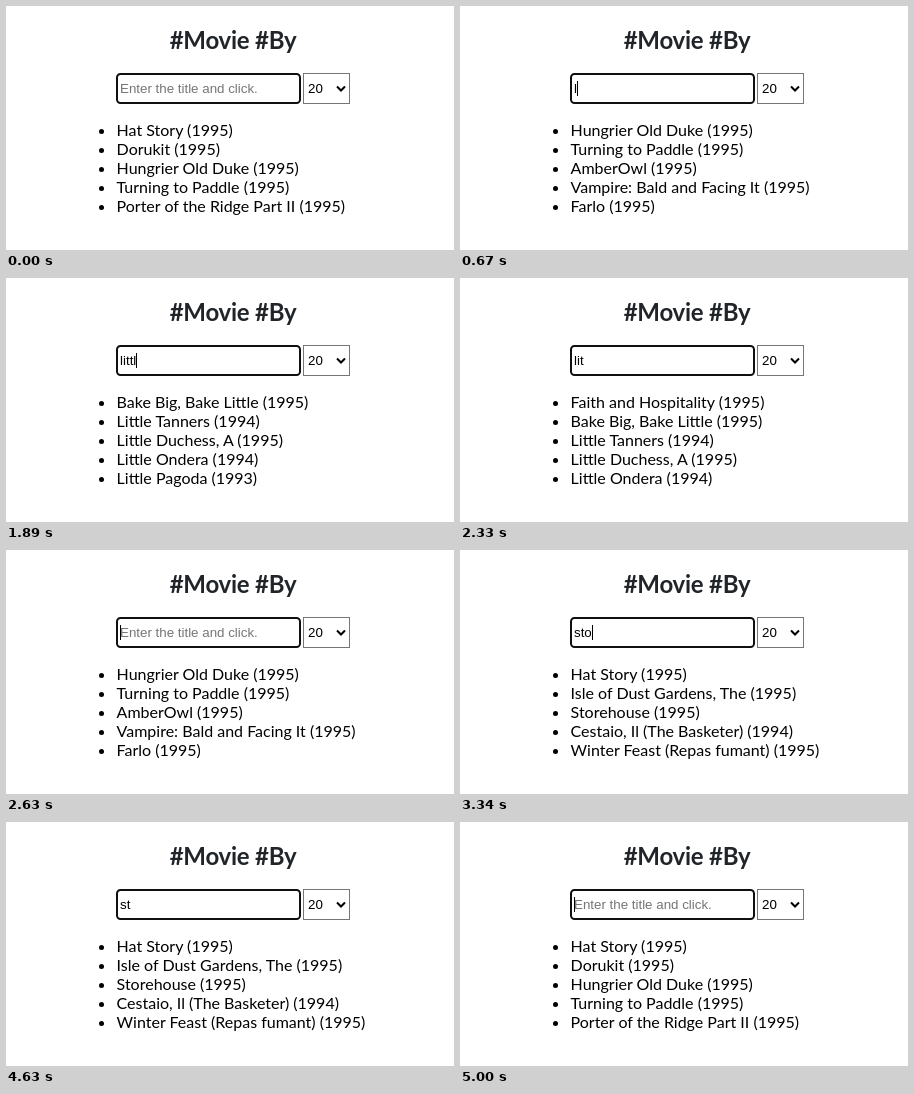
An HTML page for the animation above (5.28 s loop, 448 by 244 pixels).

```html
<!DOCTYPE html>
<html lang="en">
<head>
<meta charset="utf-8">
<title>Movie search</title>
<style>
  html, body { margin: 0; width: 100%; height: 100%; overflow: hidden; background: #fff; }
  svg { display: block; width: 448px; height: 244px; }
  .title { font: 700 24px Lato, sans-serif; letter-spacing: -.25px; fill: #212529; text-anchor: middle; }
  .field { font: 13.333px "Liberation Sans", Arial, sans-serif; white-space: pre; }
  .hint { fill: #757575; }
  #list { font: 16px Lato, sans-serif; }
</style>
</head>
<body>
<svg viewBox="0 0 448 244" xmlns="http://www.w3.org/2000/svg">
  <rect width="448" height="244" fill="#fff"/>
  <text class="title" x="227" y="42.5">#Movie #By</text>
  <rect x="111" y="68" width="183" height="29" rx="3.5" fill="#fff" stroke="#101010" stroke-width="2"/>
  <text id="hint" class="field hint" x="114" y="87">Enter the title and click.</text>
  <text id="typed" class="field" x="114" y="87"></text>
  <rect id="caret" x="114" y="75" width="1" height="15"/>
  <rect x="297.5" y="67.5" width="46" height="30" fill="#fff" stroke="#767676"/>
  <text class="field" x="302" y="87">20</text>
  <path d="M331 80.5l4 4l4 -4" fill="none" stroke="#000" stroke-width="2"/>
  <g id="list"></g>
</svg>
<script>
const LOOP = 5280, ROWS = 5, LINE = 19, LEFT = 110.6, WRAP = 40;

const movies = [
  "Hat Story (1995)",
  "Dorukit (1995)",
  "Hungrier Old Duke (1995)",
  "Turning to Paddle (1995)",
  "Porter of the Ridge Part II (1995)",
  "Cassia (1995)",
  "Season of Rain (1995)",
  "AmberOwl (1995)",
  "Vampire: Bald and Facing It (1995)",
  "Farlo (1995)",
  "Crossed Paths (1995)",
  "Thorns Apart (1995)",
  "Faith and Hospitality (1995)",
  "Isle of Dust Gardens, The (1995)",
  "When Dawn Is Calling (1995)",
  "Storehouse (1995)",
  "Cestaio, Il (The Basketer) (1994)",
  "Winter Feast (Repas fumant) (1995)",
  "Somebody Rises (Jemand liegt wach) (1994)",
  "Bake Big, Bake Little (1995)",
  "MoonHarbor Story III, The (1994)",
  "Stone Orchard (1995)",
  "Little Tanners (1994)",
  "Little Duchess, A (1995)",
  "Little Ondera (1994)",
  "Winemaker's Long Story, A (1995)",
  "Little Pagoda (1993)",
  "Story of Tingyue, The (1993)",
  "Sailor Story 4: Mission R (Hai shi qi bu) (1993)"
];

// start time, typed text, query the list answers, caret shown
const steps = [
  [0, "", "", false],
  [520, "", "", true],
  [590, "l", "", true],
  [670, "l", "l", true],
  [740, "li", "l", true],
  [890, "lit", "li", true],
  [1040, "lit", "lit", true],
  [1110, "litt", "lit", true],
  [1260, "litt", "litt", true],
  [1390, "litt", "litt", false],
  [1890, "littl", "littl", true],
  [1970, "little", "little", true],
  [2040, "little", "little", false],
  [2190, "littl", "little", false],
  [2260, "lit", "littl", false],
  [2330, "lit", "lit", false],
  [2480, "l", "li", false],
  [2560, "l", "l", false],
  [2630, "", "l", true],
  [2770, "", "", true],
  [2980, "s", "", true],
  [3130, "st", "s", true],
  [3190, "st", "st", true],
  [3340, "sto", "st", true],
  [3480, "stor", "sto", true],
  [3630, "stor", "stor", true],
  [3700, "story", "stor", true],
  [3780, "story", "story", true],
  [4210, "story", "story", false],
  [4290, "stor", "story", false],
  [4360, "sto", "stor", false],
  [4430, "sto", "sto", false],
  [4500, "st", "sto", false],
  [4630, "st", "st", false],
  [4710, "s", "st", false],
  [4780, "s", "s", false],
  [4860, "", "s", false],
  [4930, "", "s", true],
  [5000, "", "", true]
];

const byId = id => document.getElementById(id);
const hint = byId("hint"), typed = byId("typed"), caret = byId("caret"), list = byId("list");

function add(name, attrs, text = "") {
  const node = document.createElementNS("http://www.w3.org/2000/svg", name);
  for (const key in attrs) node.setAttribute(key, attrs[key]);
  node.textContent = text;
  list.append(node);
}

function search(query) {
  return movies.filter(m => m.toLowerCase().includes(query)).slice(0, ROWS);
}

function breakLines(title) {
  if (title.length <= WRAP) return [title];
  const cut = title.lastIndexOf(" ");
  return [title.slice(0, cut), title.slice(cut + 1)];
}

function drawList(query) {
  list.replaceChildren();
  let y = 130;
  for (const title of search(query)) {
    add("circle", { cx: 95.5, cy: y - 4.5, r: 2.5 });
    for (const line of breakLines(title)) {
      add("text", { x: LEFT, y }, line);
      y += LINE;
    }
  }
}

let shown;

function draw(time) {
  const step = steps.findLast(s => s[0] <= time);
  if (step === shown) return;
  const [, text, query, caretOn] = step;
  hint.style.display = text ? "none" : "";
  typed.textContent = text;
  const width = text ? typed.getComputedTextLength() : 0;
  caret.setAttribute("x", Math.round(114 + width));
  caret.style.display = caretOn ? "" : "none";
  if (!shown || shown[2] !== query) drawList(query);
  shown = step;
}

const start = performance.now();
function tick() {
  draw((performance.now() - start) % LOOP);
  requestAnimationFrame(tick);
}
tick();
</script>
</body>
</html>
```
